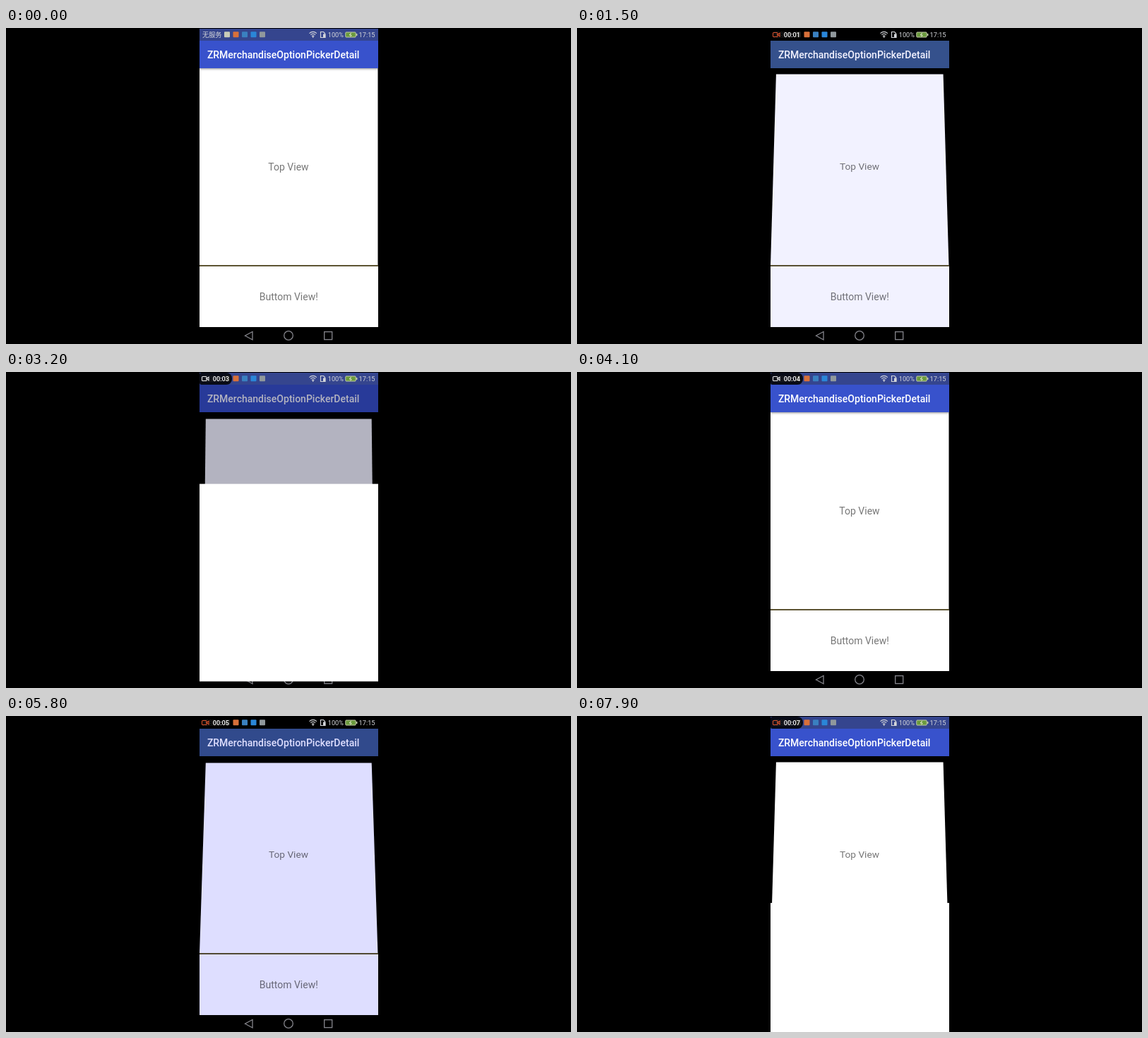
Write an HTML page that moves like this. It is 800 px wide and 448 px high and loops after 8 s.

```html
<!DOCTYPE html>
<html lang="en">
<head>
<meta charset="utf-8">
<title>Bottom sheet</title>
<style>
  html, body { margin: 0; width: 100%; height: 100%; overflow: hidden; background: #000; }
  #stage { position: relative; width: 800px; height: 448px; overflow: hidden; background: #000;
    font-family: Roboto, sans-serif; }
  #stage div { position: absolute; }
  #stage .col { left: 274px; width: 252.5px; }
  .label { color: #777; font-size: 14px; text-align: center; white-space: nowrap; }
  #card, #card div { height: 280px; line-height: 280px; }
  #card { top: 57px; background: #fff; }
  #card div { left: 0; width: 252px; }
  #foot { top: 338px; height: 86px; line-height: 86px; background: #fff; }
  #rule { top: 336px; height: 2px; background: #5d5432; }
  #bar { top: 18px; height: 39px; line-height: 40px; box-shadow: 0 1px 3px rgba(0, 0, 0, .45);
    color: #fff; font-size: 14px; font-weight: 500; text-indent: 10.9px; white-space: nowrap; }
  #dim { top: 18px; height: 406px; mix-blend-mode: multiply; }
  #status { top: 1px; height: 17px; }
  #sheet { top: 144px; height: 280px; background: #fff; }
  #pill { left: 274px; top: 1px; width: 45.5px; height: 17px; border-radius: 3px 8px 8px 3px;
    background: rgba(0, 0, 0, .84); }
  svg { position: absolute; left: 0; top: 0; }
  svg text { font: 9.2px Roboto, "Noto Sans CJK SC", "Noto Sans CJK", sans-serif; fill: #d4d6da; }
  #touch { left: 346.5px; top: 431.5px; width: 15px; height: 15px; box-sizing: border-box;
    border: 2px solid #8890a8; border-radius: 50%; background: #cfcfae; }
</style>
</head>
<body>
<div id="stage">
  <div id="card" class="col label"><div id="cardText">Top View</div></div>
  <div id="foot" class="col label">Buttom View!</div>
  <div id="rule" class="col"></div>
  <div id="bar" class="col">ZRMerchandiseOptionPickerDetail</div>
  <div id="dim" class="col"></div>
  <div id="status" class="col"></div>
  <svg width="800" height="448" fill="none">
    <text x="278" y="12.8">无服务</text>
    <g id="notes"></g>
    <g stroke="#d4d6da" stroke-width="1.2">
      <path d="M429.5 7.6q5.2-4.4 10.4 0M431.3 9.6q3.4-2.8 6.8 0M433 11.5q1.7-1.4 3.4 0"/>
      <path d="M445.5 5.5h4l2 2v6h-6z"/>
    </g>
    <circle cx="434.7" cy="12.8" r="1" fill="#d4d6da"/>
    <rect x="449" y="8.5" width="3.6" height="5.5" fill="#d4d6da"/>
    <text x="455.8" y="12.8">100%</text>
    <rect x="480.8" y="6" width="14.4" height="7" rx="1" fill="#6a9a3c" stroke="#c4cca8"/>
    <rect x="495.8" y="8" width="1.6" height="3" fill="#c4cca8"/>
    <path d="M488.8 7l-2.6 3h3l-1.6 2.4" stroke="#e8ecd8"/>
    <text x="499.6" y="12.8">17:15</text>
    <g stroke="#85858c" stroke-width="1.3">
      <path d="M349 430.5v11.5l-10.5-5.8z"/>
      <circle cx="400" cy="436" r="6.3"/>
      <rect x="450.7" y="430.7" width="11" height="11"/>
    </g>
  </svg>
  <div id="pill">
    <svg width="46" height="17" fill="none">
      <g id="cam" stroke-width="1.1">
        <rect x="3.5" y="5.5" width="6.5" height="6" rx="1"/>
        <path d="M10 8.5l3-2.4v4.8z"/>
      </g>
      <text id="clock" x="18.7" y="12.2" style="font-weight:500;fill:#fff"></text>
    </svg>
  </div>
  <div id="sheet" class="col"></div>
  <div id="touch"></div>
</div>
<script>
const LOOP = 8000;
const SPAN = 9000; // the last closing runs past the cut
const OPEN = [1230, 5490];
const CLOSE = [3100, 7570];
const $ = id => document.getElementById(id);
const anims = [];

// steps: [ms, properties, easing to the next step]
function play(id, steps) {
  const frames = steps.map(([ms, props, easing = 'linear']) => ({ offset: ms / SPAN, easing, ...props }));
  const anim = $(id).animate(frames, { duration: SPAN, fill: 'both' });
  anim.pause();
  anims.push(anim);
}

// Repeats the opening and closing steps for both visits of the sheet.
function cycle(id, rest, opening, closing) {
  const shift = (steps, by) => steps.map(([ms, ...more]) => [ms + by, ...more]);
  const steps = OPEN.flatMap((at, i) => [...shift(opening, at), ...shift(closing, CLOSE[i])]);
  play(id, [[0, rest], ...steps, [SPAN, rest]]);
}

const quad = (top, low, y1, y2) => ({
  clipPath: `polygon(${top}px ${y1}px, ${252.5 - top}px ${y1}px, ${252.5 - low}px ${y2}px, ${low}px ${y2}px)`
});
const scale = (s, y) => ({ transform: `translateY(${y}px) scale(${s})` });
const fade = opacity => ({ opacity });
const paint = backgroundColor => ({ backgroundColor });
const slide = y => ({ transform: `translateY(${y}px)` });

// Lean back, straighten while shrunk; the same backwards.
function lean(id, flat, tilted, small) {
  cycle(id, flat,
    [[0, flat], [300, tilted], [340, tilted], [640, small]],
    [[0, small], [300, tilted], [600, flat]]);
}
function swap(id, normal, covered) {
  cycle(id, normal,
    [[0, normal, 'step-end'], [240, covered, 'step-end']],
    [[0, normal, 'step-end']]);
}

lean('card', quad(0, 0, 0, 280), quad(8.8, 0, 9.4, 280), quad(8.8, 8.8, 9.4, 269));
lean('cardText', scale(1, 0), scale(.975, -.7), scale(.93, -1));
swap('bar', paint('#3852cc'), paint('#38558c'));
swap('status', paint('#35458e'), paint('#000000'));

const clear = paint('#ffffff');
const haze = paint('#dedeff');
const dark = paint('#666680');
cycle('dim', clear,
  [[0, clear], [245, clear], [310, haze], [555, dark]],
  [[0, dark], [200, clear]]);
cycle('sheet', slide(304),
  [[0, slide(304)], [330, slide(304), 'ease-out'], [700, slide(0)]],
  [[0, slide(0), 'ease-in'], [575, slide(304)]]);
play('touch', [[0, fade(0), 'step-end'], [6700, fade(1), 'step-end'], [7200, fade(0)], [SPAN, fade(0)]]);
play('pill', [[0, fade(0), 'step-end'], [100, fade(1)], [SPAN, fade(1)]]);

['#c8ccb8', '#d8703a', '#3a80c0', '#2a86d8', '#90989c'].forEach((fill, i) => {
  $('notes').innerHTML += `<rect x="${309 + i * 12.5}" y="5.2" width="8" height="8" rx="1" fill="${fill}"/>`;
});

let start;
function draw(now) {
  start ??= now;
  const t = (now - start) % LOOP;
  anims.forEach(anim => { anim.currentTime = t; });
  const ticks = t + 99;
  $('clock').textContent = '00:0' + Math.min(7, Math.floor(ticks / 1000));
  $('cam').setAttribute('stroke', ticks % 1000 < 500 ? '#e8e8e8' : '#d8532f');
  requestAnimationFrame(draw);
}
requestAnimationFrame(draw);
</script>
</body>
</html>
```
